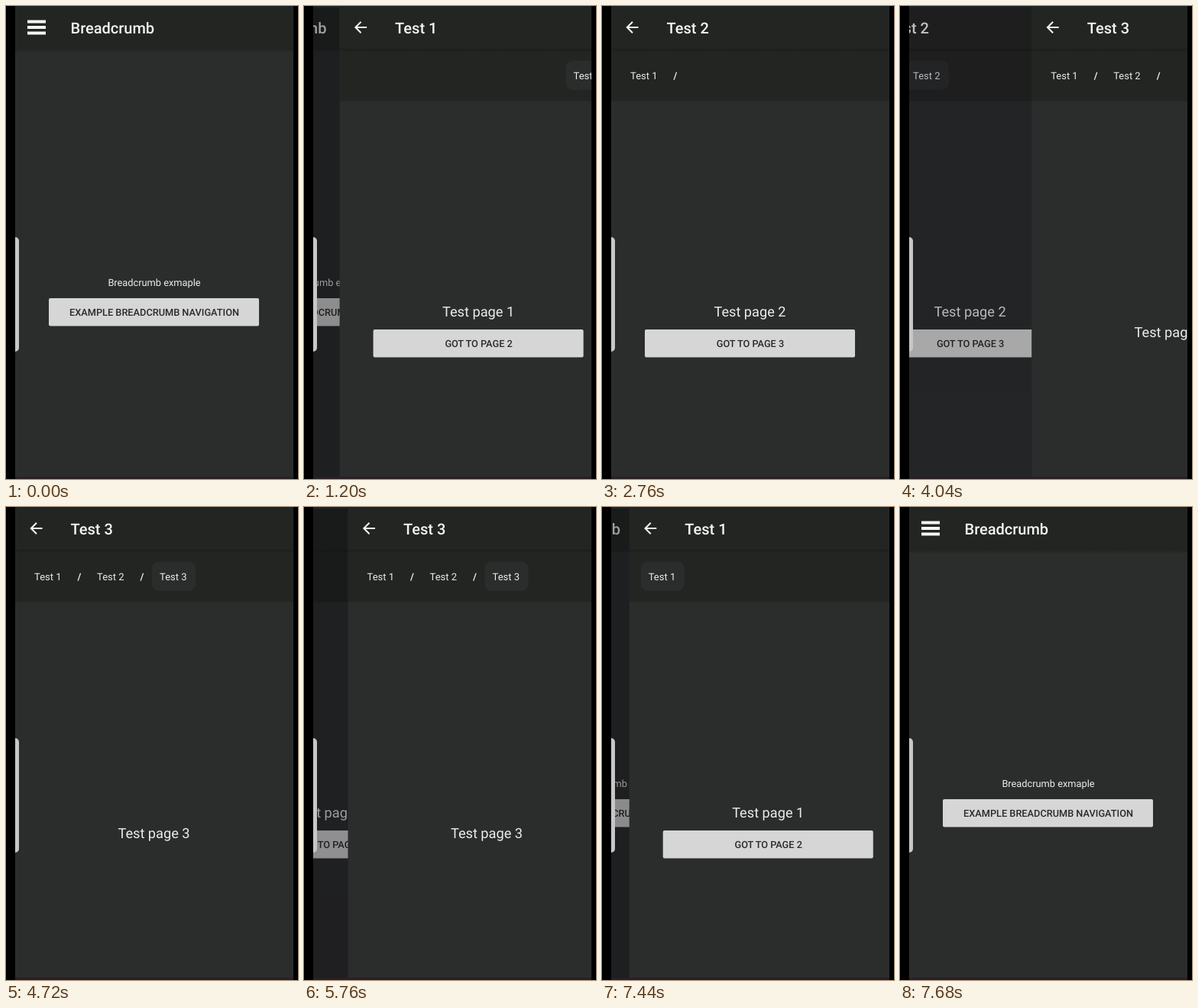
Recreate the animation shown at these times as an HTML page. Size 382 px wide and 620 px high, loop 8 s.

```html
<!DOCTYPE html>
<html lang="en">
<head>
<meta charset="utf-8">
<title>Breadcrumb navigation</title>
<style>
  html, body { margin: 0; width: 100%; height: 100%; overflow: hidden; background: #000; }
  svg { display: block; width: 100%; height: 100%; }
  text { font-family: Roboto, sans-serif; fill: #ececec; text-rendering: geometricPrecision; }
  .title { font-size: 20px; font-weight: 500; fill: #f4f4f4; }
  .heading { font-size: 18.2px; }
  .small { font-size: 12.8px; }
  .crumb { font-size: 13px; }
  .slash { font-size: 13px; font-weight: 700; }
  .label { font-size: 12.75px; font-weight: 500; fill: #2a2a2a; }
  .mid { text-anchor: middle; }
  .icon { stroke: #f6f6f6; fill: none; }
</style>
</head>
<body>
<svg viewBox="0 0 382 620">
  <defs>
    <clipPath id="screen"><rect x="12" width="364" height="620"/></clipPath>
    <clipPath id="trail"><rect x="27" y="58" width="334" height="66"/></clipPath>
    <linearGradient id="shade" x2="0" y2="1">
      <stop stop-color="#000" stop-opacity=".2"/>
      <stop offset="1" stop-color="#000" stop-opacity="0"/>
    </linearGradient>
  </defs>
  <rect width="382" height="620" fill="#000"/>
  <g clip-path="url(#screen)">
    <rect x="12" width="364" height="620" fill="#08070c"/>
    <g id="pages"></g>
    <rect x="12" width="364" height="2" fill="#1a252c"/>
    <rect x="12" y="617" width="364" height="3" fill="#291f26"/>
    <rect x="6" y="303" width="11" height="150" rx="5" fill="#c6c7c6"/>
  </g>
</svg>
<script>
const LOOP = 8000, FRAME = 40, WIDTH = 364, CRUMB_GAP = 82;
const CRUMB_DELAY = 10, CRUMB_TIME = 750;

// Page 0 is the start page; deeper pages always lie on top.
const moves = [
  { at: 1019, from: 0, to: 1, time: 200 },
  { at: 2556, from: 1, to: 2, time: 200 },
  { at: 3928, from: 2, to: 3, time: 200 },
  { at: 5735, from: 3, to: 1, time: 200 },
  { at: 7425, from: 1, to: 0, time: 230 }
];

const text = (kind, x, y, words) => `<text class="${kind}" x="${x}" y="${y}">${words}</text>`;

const button = (y, words) =>
  `<rect x="56" y="${y}" width="275" height="36.5" rx="2" fill="#d6d6d6"/>` +
  text('label mid', 194, y + 23, words);

const bar = (y, height) =>
  `<rect x="12" y="${y}" width="${WIDTH}" height="${height}" fill="#232522"/>`;

const shade = y => `<rect x="12" y="${y}" width="${WIDTH}" height="4" fill="url(#shade)"/>`;

const burger = '<path class="icon" stroke-width="4" d="M28 20.5H52M28 28H52M28 35.5H52"/>';
const arrow = '<path class="icon" stroke-width="2" d="M47.5 28H33M40 20.8L32.8 28L40 35.2"/>';

function crumbs(depth) {
  let trail = '';
  for (let i = 1; i <= depth; i++) {
    const x = 27 + (i - 1) * CRUMB_GAP;
    const name = text('crumb', x + 10, 96, 'Test ' + i);
    trail += i < depth
      ? name + text('slash mid', x + 69, 96, '/')
      : `<g class="last"><rect x="${x}" y="71.5" width="57" height="38.5" rx="9" fill="#2b2d2d"/>${name}</g>`;
  }
  return `<g clip-path="url(#trail)">${trail}</g>`;
}

function page(depth) {
  const body = depth === 0
    ? shade(57) + burger + text('title', 84.5, 36, 'Breadcrumb') +
      text('small mid', 194, 367, 'Breadcrumb exmaple') +
      button(383, 'EXAMPLE BREADCRUMB NAVIGATION')
    : bar(57, 67.5) + shade(56) + arrow + text('title', 84.5, 36, 'Test ' + depth) +
      crumbs(depth) +
      text('heading mid', 193.5, depth < 3 ? 406.5 : 433.5, 'Test page ' + depth) +
      (depth < 3 ? button(424, 'GOT TO PAGE ' + (depth + 1)) : '');
  return `<g><rect x="12" width="${WIDTH}" height="620" fill="#2b2d2d"/>${bar(0, 57)}${body}</g>`;
}

const stack = document.getElementById('pages');
stack.innerHTML = [0, 1, 2, 3].map(page).join('');
const pages = [...stack.children];
const lastCrumbs = pages.map(p => p.querySelector('.last'));

const progress = (t, start, time) => Math.min(1, Math.max(0, (t - start) / time));

function place(node, x, opacity = 1) {
  node.setAttribute('transform', `translate(${x.toFixed(2)} 0)`);
  node.setAttribute('opacity', opacity);
}

function draw(t) {
  const move = moves.filter(m => m.at <= t).pop() || moves[0];
  const pushing = move.to > move.from;
  const p = progress(t, move.at, move.time);
  const cover = pushing ? p : 1 - p;
  const upper = Math.max(move.from, move.to);
  const lower = Math.min(move.from, move.to);

  pages.forEach((node, i) => {
    const shown = (i === upper && cover > 0) || (i === lower && cover < 1);
    node.setAttribute('visibility', shown ? 'visible' : 'hidden');
  });
  place(pages[upper], WIDTH * (1 - cover));
  place(pages[lower], -WIDTH / 2 * cover, 1 - 0.39 * cover);

  lastCrumbs.forEach((node, i) => {
    if (!node) return;
    const entering = pushing && i === move.to;
    const left = entering ? 1 - progress(t, move.at + CRUMB_DELAY, CRUMB_TIME) : 0;
    place(node, WIDTH * left);
  });
}

const begin = performance.now();
function tick() {
  const t = (performance.now() - begin) % LOOP;
  draw(Math.floor(t / FRAME) * FRAME);
  requestAnimationFrame(tick);
}
tick();
</script>
</body>
</html>
```
